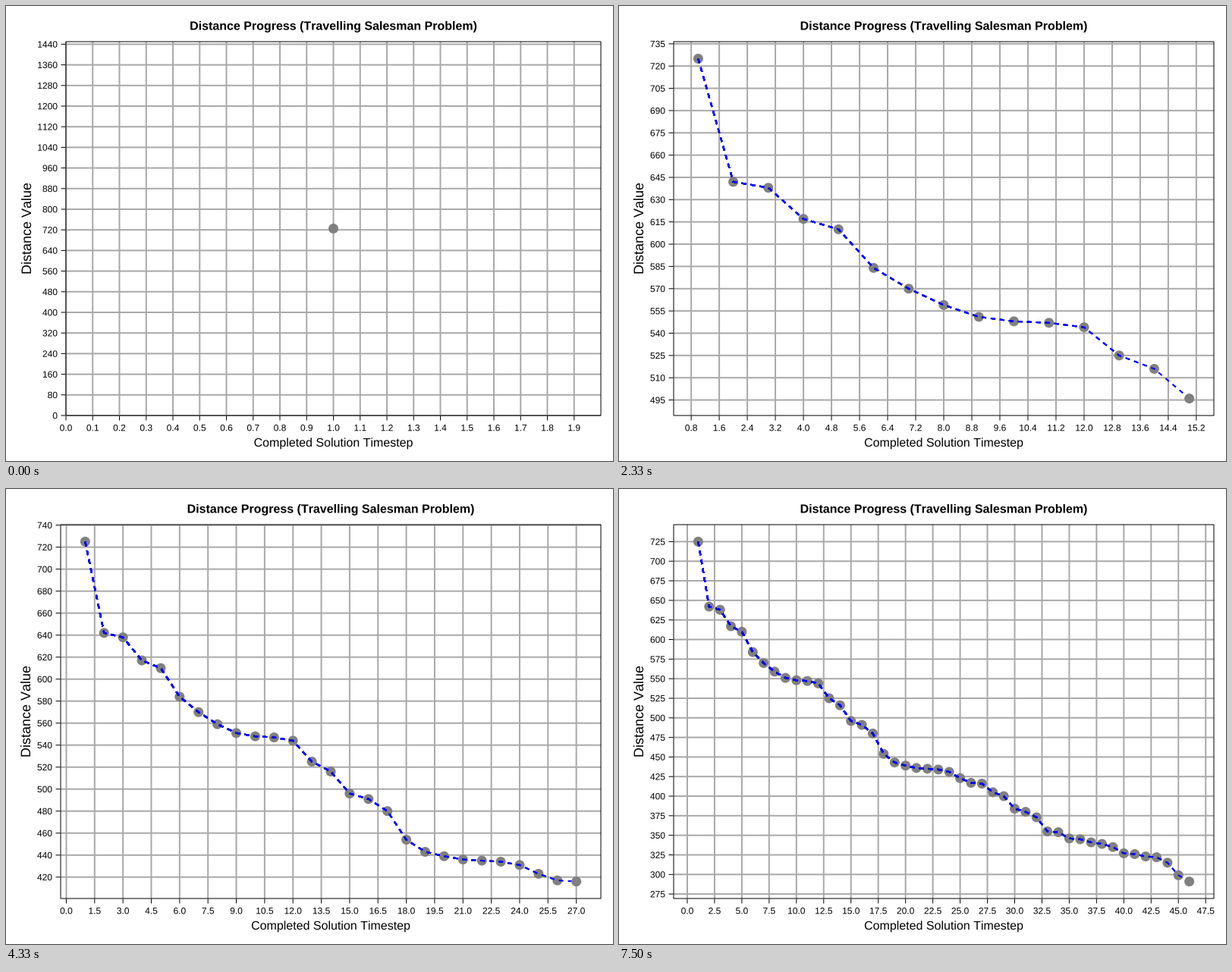
These frames come from a looping animation (800 by 600 pixels, 7670 ms). A matplotlib script:

```python
from functools import lru_cache
from math import floor, log10

import matplotlib.pyplot as plt
import numpy as np
from matplotlib.animation import FuncAnimation
from matplotlib.patches import Circle, PathPatch, Rectangle
from matplotlib.textpath import TextPath
from matplotlib.transforms import Affine2D

plt.rcParams.update({"path.snap": False, "path.simplify": False,
                     "text.kerning_factor": 6})

W, H, DPI = 800, 600, 100
PX = 72 / DPI  # one pixel in points
LOOP_MS, TICK_MS = 7670, 65
TOP, RIGHT, BOTTOM = 47, 784, 540
STEPS = (1, 1.5, 2, 2.5, 3, 4, 5, 6, 8, 10)

DISTANCES = np.array([
    725, 642, 638, 617, 610, 584, 570, 559, 551, 548, 547, 544,
    525, 516, 496, 491, 480, 454, 443, 439, 436, 435, 434, 431,
    423, 417, 416, 405, 400, 384, 380, 373, 355, 354, 346, 345,
    341, 339, 335, 327, 326, 323, 322, 315, 299, 291])
TIMES = np.arange(1, len(DISTANCES) + 1)
# Six points a second, rounded to hundredths.
STARTS = np.round((TIMES - 1) * 100 / 6) * 10

fig = plt.figure(figsize=(W / DPI, H / DPI), dpi=DPI, facecolor="white")
ax = fig.add_axes([0, 0, 1, 1])


@lru_cache(maxsize=None)
def text_path(text, size, weight):
    """Glyph outlines and advance width of a line of text."""
    prop = {"family": "Liberation Sans", "weight": weight}

    def outline(s):
        return TextPath((0, 0), s, size=size, prop=prop)

    width = outline(text + "|").get_extents().x1 - outline("|").get_extents().x1
    return outline(text), width


def label(x, y, text, size, align=0.5, weight="normal", angle=0):
    path, width = text_path(text, size, weight)
    place = (Affine2D().translate(-align * width, 0).scale(1, -1)
             .rotate_deg(-angle).translate(x, y))
    ax.add_patch(PathPatch(place.transform_path(path), fc="black", lw=0))


def limits(values):
    lo, hi = float(values.min()), float(values.max())
    if lo == hi:
        return 0.0, 2 * hi
    pad = 0.05 * (hi - lo)
    return lo - pad, hi + pad


def ticks(lo, hi, count=20):
    """Round tick values in the range and their labels."""
    raw = (hi - lo) / count
    scale = 10.0 ** floor(log10(raw))
    step = next(s * scale for s in STEPS if s * scale >= raw)
    values = np.arange(-(-lo // step), hi // step + 1) * step
    digits = next(d for d in range(6) if np.allclose(values, values.round(d),
                                                     rtol=0, atol=1e-7))
    return values, [f"{abs(v) if abs(v) < 1e-9 else v:.{digits}f}" for v in values]


def draw_chart(n):
    """Draw the whole chart with its first n points."""
    ax.clear()
    ax.set(xlim=(0, W), ylim=(H, 0))
    ax.axis("off")

    xlo, xhi = limits(TIMES[:n])
    ylo, yhi = limits(DISTANCES[:n])
    xvals, xnames = ticks(xlo, xhi)
    yvals, ynames = ticks(ylo, yhi)
    wide = len(ynames[-1]) > 3
    left = 79 if wide else 72

    def sx(v):
        return left + (v - xlo) / (xhi - xlo) * (RIGHT - left)

    def sy(v):
        return BOTTOM - (v - ylo) / (yhi - ylo) * (BOTTOM - TOP)

    grid = dict(colors="#a9a9a9", lw=2 * PX, zorder=1)
    ax.vlines(sx(xvals), TOP, BOTTOM, **grid)
    ax.hlines(sy(yvals), left, RIGHT, **grid)

    # Every step lays its whole line, then its newest point, over the earlier ones.
    px, py = sx(TIMES[:n]), sy(DISTANCES[:n])
    for k in range(n):
        if k:
            ax.plot(px[:k + 1], py[:k + 1], color="blue", lw=2 * PX,
                    ls=(0, (3, 3)), dash_joinstyle="miter", zorder=2 + k)
        ax.add_patch(Circle((px[k], py[k]), 6.5, fc="gray", lw=0, zorder=2.5 + k))

    ax.add_patch(Rectangle((left, TOP), RIGHT - left, BOTTOM - TOP, fill=False,
                           ec="black", lw=PX, zorder=100))
    tick = dict(colors="black", lw=PX, zorder=100)
    ax.vlines(sx(xvals), BOTTOM + 0.5, BOTTOM + 6.5, **tick)
    ax.hlines(sy(yvals), left - 6.5, left - 0.5, **tick)

    for v, name in zip(xvals, xnames):
        label(sx(v), 560.3, name, 12)
    for v, name in zip(yvals, ynames):
        label(left - 11, sy(v) + 4.3, name, 12, align=1)

    mid = (left + RIGHT) / 2
    label(mid, 31.5, "Distance Progress (Travelling Salesman Problem)", 16,
          weight="bold")
    label(mid, 581, "Completed Solution Timestep", 16)
    label(33 if wide else 32, (TOP + BOTTOM) / 2, "Distance Value", 18, angle=90)


def update(i):
    # Show every point that starts before this tick ends.
    n = int(np.searchsorted(STARTS, (i + 1) * TICK_MS))
    if n != update.shown:
        draw_chart(n)
        update.shown = n


update.shown = 0
anim = FuncAnimation(fig, update, frames=LOOP_MS // TICK_MS,
                     init_func=lambda: None, interval=TICK_MS,
                     repeat=True, repeat_delay=0)
plt.show()
```
